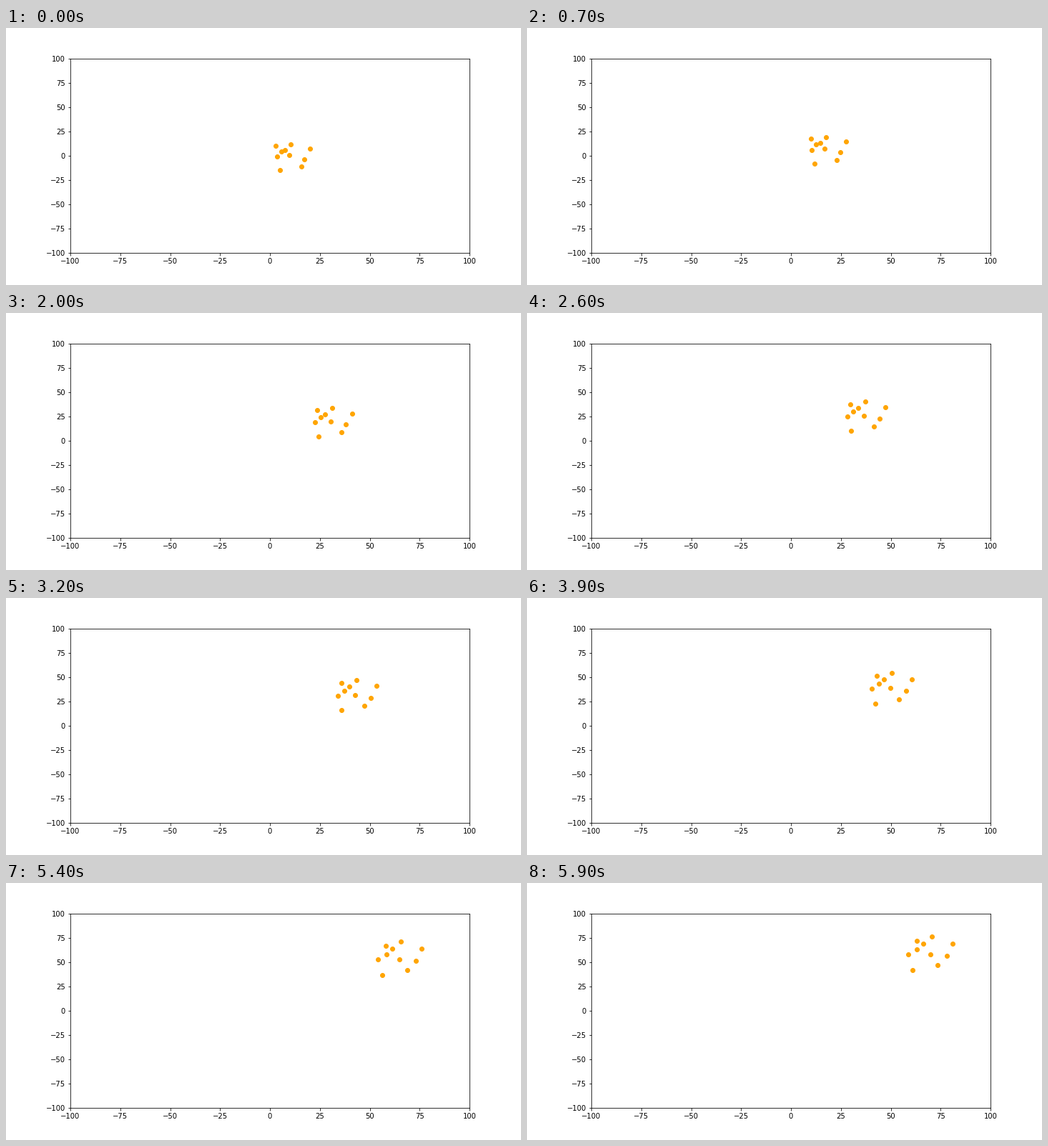
Write a matplotlib script that moves like this. It is 720 by 360 pixels and loops after 6 s.

```python
import numpy as np
import matplotlib.pyplot as plt
from matplotlib.animation import FuncAnimation

FRAMES = 60
INTERVAL = 100

# Where each dot of the flock starts and ends its drift, in axis units
START = np.array([
    (2.9, 10.4), (5.7, 4.5), (7.5, 6.0), (10.4, 11.8), (3.6, -0.7),
    (9.7, 0.8), (20.1, 7.4), (17.2, -3.6), (15.8, -11.0), (5.0, -14.6),
])
END = np.array([
    (63.1, 72.2), (63.1, 63.4), (66.3, 69.2), (70.6, 76.6), (58.8, 58.2),
    (69.9, 58.2), (81.0, 69.2), (78.1, 56.7), (73.5, 47.2), (60.9, 42.0),
])

plt.rcParams["font.family"] = "DejaVu Sans"
plt.rcParams["font.size"] = 10

fig, ax = plt.subplots(figsize=(10, 5), dpi=72, facecolor="white")
fig.subplots_adjust(left=0.125, right=0.9, bottom=0.125, top=0.88)
ax.set_xlim(-100, 100)
ax.set_ylim(-100, 100)

dots = ax.scatter(*START.T, s=36, color="orange")


def update(frame):
    progress = frame / (FRAMES - 1)
    # The flock runs slightly ahead to the right in mid-course
    lead = np.array([0.35 * np.sin(np.pi * progress), 0])
    dots.set_offsets(START + (END - START) * progress + lead)
    return (dots,)


anim = FuncAnimation(fig, update, frames=FRAMES, interval=INTERVAL, repeat=True)
plt.show()
```
